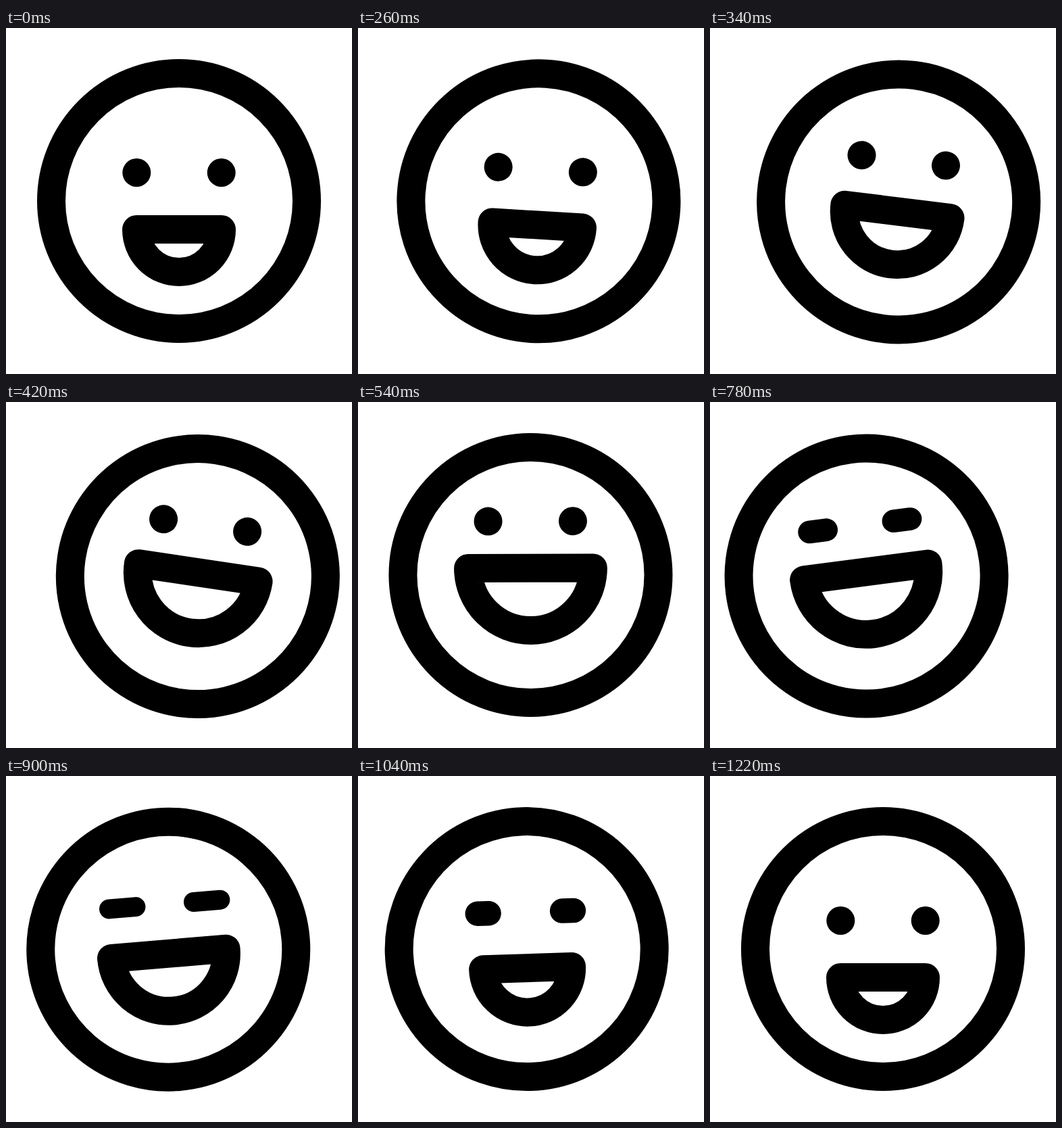
An HTML page for the animation above (2000 ms loop, 512 by 512 pixels).

```html
<!DOCTYPE html>
<html lang="en">
<head>
<meta charset="utf-8">
<title>Laughing face</title>
<style>
  html, body { margin: 0; width: 100%; height: 100%; overflow: hidden; background: #fff; }
  svg { display: block; width: 100%; height: 100%; }
  g { fill: none; stroke: #000; stroke-width: 42; stroke-linecap: round; stroke-linejoin: round; }
</style>
</head>
<body>
<svg viewBox="0 0 512 512">
  <g id="face">
    <circle r="189"/>
    <path id="eyes"/>
    <path id="mouth"/>
  </g>
</svg>
<script>
const LOOP = 2000;
const [face, eyes, mouth] = ['face', 'eyes', 'mouth'].map(id => document.getElementById(id));

// Cubic Bezier easing, solved by bisection
const bezier = (x1, y1, x2, y2) => x => {
  const at = (s, a, b) => 3 * a * s * (1 - s) ** 2 + 3 * b * s * s * (1 - s) + s ** 3;
  let lo = 0, hi = 1;
  for (let i = 0; i < 24; i++) {
    const mid = (lo + hi) / 2;
    if (at(mid, x1, x2) < x) lo = mid; else hi = mid;
  }
  return at(lo, y1, y2);
};

const smooth = x => x * x * (3 - 2 * x);
const swing = bezier(.167, 0, .833, 1);
const settle = bezier(.167, 0, .667, 1);
const sink = bezier(.333, .1, .667, .767);

// Progress from 0 to 1 between two times
const ramp = (t, from, to, ease = smooth) => {
  const x = (t - from) / (to - from);
  return x <= 0 ? 0 : x >= 1 ? 1 : ease(x);
};

function draw(t) {
  const tilt = 9 * (ramp(t, 165, 403, swing) - 2 * ramp(t, 403, 675, swing) + ramp(t, 675, 1220, settle));
  const rise = ramp(t, 200, 470);
  const lift = 37.6 * (rise - ramp(t, 680, 1220, sink));
  const radius = 63 + 29.4 * (rise - ramp(t, 809, 1092));
  const squint = ramp(t, 690, 850) - ramp(t, 851, 1186);

  // The head rocks on its lowest point
  face.setAttribute('transform', `translate(256 256) rotate(${tilt} 0 189)`);

  const half = 21 * squint;
  const eye = x => `M${x - half} ${-42 - lift}h${2 * half + .01}`;
  eyes.setAttribute('d', eye(-62.7) + eye(62.7));
  eyes.setAttribute('stroke-width', 42 - 13.8 * squint);

  const top = 73.5 - lift - radius / 2;
  mouth.setAttribute('d', `M${-radius} ${top}A${radius} ${radius} 0 0 0 ${radius} ${top}Z`);
}

function frame() {
  draw(performance.now() % LOOP);
  requestAnimationFrame(frame);
}
frame();
</script>
</body>
</html>
```
